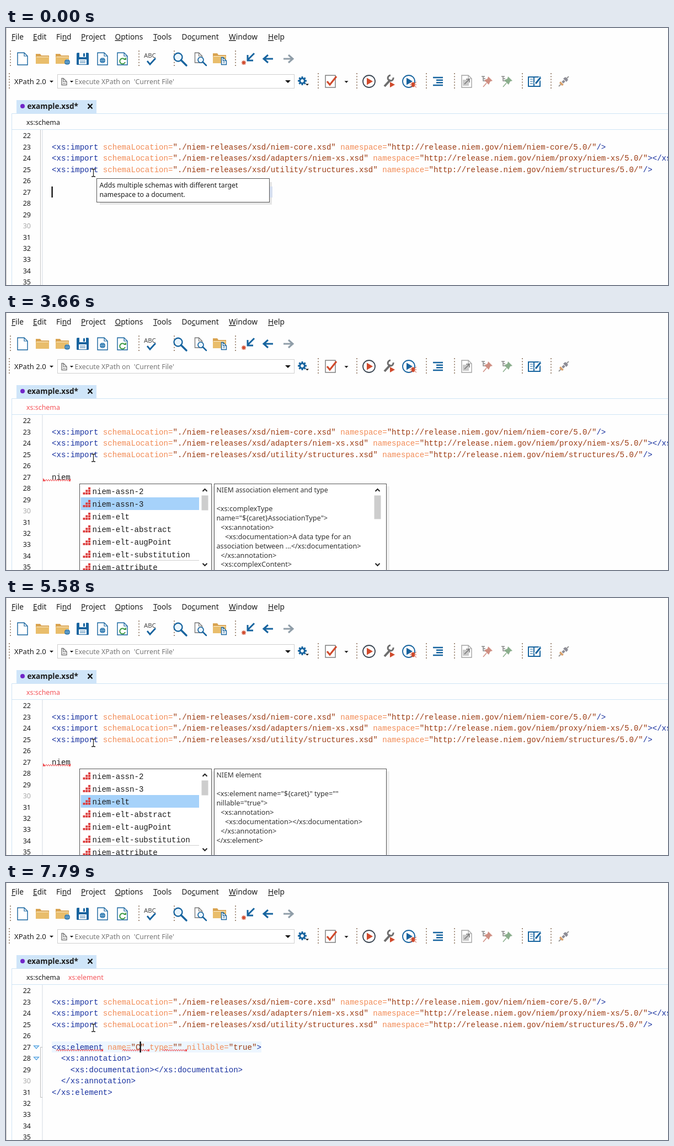
These frames come from a looping animation (1200x467 px, 8000 ms). An HTML page:

```html
<!DOCTYPE html>
<html lang="en">
<head>
<meta charset="utf-8">
<title>Code template completion</title>
<style>
html, body { margin: 0; width: 100%; height: 100%; overflow: hidden; background: #fefefe; }
svg { display: block; width: 100vw; height: 100vh; }
text { white-space: pre; font-family: "Noto Sans", "Open Sans", sans-serif; fill: #1c1c1c; }
.code { font-family: "Liberation Mono", "Courier New", monospace; font-size: 14.07px; }
.tag { fill: #17309f; }
.attr { fill: #f28b55; }
.val { fill: #9c3b12; }
.u { text-decoration: underline; }
</style>
</head>
<body>
<svg id="stage" viewBox="0 0 1200 467" xmlns="http://www.w3.org/2000/svg"></svg>
<script>
const LOOP = 8000, CHAR = 8.445, LEFT = 83;
const BLUE = '#17649f', TAN = '#e9bd6b', RED = '#d04a2c', GREY = '#a3a3a3';

const esc = s => s.replace(/&/g, '&amp;').replace(/</g, '&lt;').replace(/>/g, '&gt;');
const rect = (x, y, w, h, fill, more = '') =>
  `<rect x="${x}" y="${y}" width="${w}" height="${h}" fill="${fill}" ${more}/>`;
const line = (d, color, width = 1, more = '') =>
  `<path d="${d}" fill="none" stroke="${color}" stroke-width="${width}" ${more}/>`;
const shape = (d, fill, more = '') => `<path d="${d}" fill="${fill}" ${more}/>`;
const disc = (x, y, r, fill, more = '') => `<circle cx="${x}" cy="${y}" r="${r}" fill="${fill}" ${more}/>`;
const label = (x, y, size, s, more = '') =>
  `<text x="${x}" y="${y}" font-size="${size}" ${more}>${esc(s)}</text>`;
const at = (x, y, art) => `<g transform="translate(${x} ${y})">${art}</g>`;
const rowY = n => 196 + 20.47 * (n - 22);

// Colours tags, attributes and quoted values of one line of markup.
function code(x, y, s) {
  const parts = s.match(/"[^"]*"|<\/?[\w:]+|\/?>|[\w]+=|\s+|[^\s<>"]+/g) || [];
  const kind = p => p[0] === '"' ? 'val' : /^[<\/>]/.test(p) ? 'tag' : /=$/.test(p) ? 'attr' : '';
  return `<text class="code" x="${x}" y="${y}">` +
    parts.map(p => `<tspan class="${kind(p)}">${esc(p)}</tspan>`).join('') + '</text>';
}
const codeRow = (n, indent, s) => code(LEFT + indent * CHAR, rowY(n) + 4.5, s);

/* Toolbar icons, each drawn around its own centre */
const page = (w = 18, h = 22, color = BLUE) => {
  const x = w / 2, y = h / 2;
  return shape(`M${-x} ${-y}H${x - 6}L${x} ${6 - y}V${y}H${-x}Z`, '#fff', `stroke="${color}" stroke-width="1.4"`) +
    line(`M${x - 6} ${-y}V${6 - y}H${x}`, color, 1.2);
};
const folder = () => shape('M-12 9V-9H-4L-2 -6H12V9Z', '#d9a350') + shape('M-12 9V-3H12V9Z', TAN) +
  line('M-11 -3.5H11', '#fff3d6');
const globe = (r = 5) => disc(0, 0, r, BLUE) +
  line(`M${-r} 0H${r}M0 ${-r}V${r}`, '#a9d3ee', .8) + `<ellipse rx="${r / 2}" ry="${r}" fill="none" stroke="#a9d3ee" stroke-width=".7"/>`;
const lens = (r, w) => disc(0, 0, r, '#eaf5fd', `stroke="${BLUE}" stroke-width="${w}"`) +
  line(`M${r * .7} ${r * .7}L${r * 2} ${r * 2}`, BLUE, w * 1.5, 'stroke-linecap="round"');
const arrow = color => line('M9 0H-7M0 -7L-8 0L0 7', color, 3);
const drop = (x, y, r = 4) => shape(`M${x - r} ${y - r / 2}h${2 * r}l${-r} ${r}z`, '#111');
const grip = (x, y) => line(`M${x} ${y - 15}v30`, '#a08a78', 2, 'stroke-dasharray="2 3.2"');
const play = color => disc(0, 0, 11, '#fff', `stroke="${color}" stroke-width="1.8"`);
const pin = color => shape('M1 -10L9 -2L5 -1L2 5L-6 -3L0 -6Z', color) + line('M-2 2L-8 9', color, 1.5);
const gear = () => {
  let teeth = '';
  for (let i = 0; i < 8; i++) teeth += rect(-1.5, -8, 3, 4, BLUE, `transform="rotate(${i * 45})"`);
  return teeth + disc(0, 0, 4.4, '#fff', `stroke="${BLUE}" stroke-width="3"`);
};

function topBar() {
  const save = rect(-11, -11, 22, 22, BLUE, 'rx="1.5"') + rect(-6, -11, 12, 8, '#fff') +
    rect(1, -10, 3, 6, BLUE) + rect(-7, 1, 14, 9, '#fff') + line('M-5 4H5M-5 7H5', BLUE);
  const reload = line('M4 -2A5 5 0 1 0 5 3', '#3c9a45', 2) + shape('M2 -1H7V-6Z', '#3c9a45');
  const burst = line('M-9 3V11M-13 7H-5M-12 4L-6 10M-12 10L-6 4', RED, 1.5);
  return [8, 241, 305, 416].map(x => grip(x, 56)).join('') +
    at(30, 56, page()) + at(66, 56, folder()) +
    at(102, 56, folder() + at(9, 6, globe())) + at(139, 56, save) +
    at(175, 56, page() + at(0, 3, globe())) + at(211, 56, page() + at(0, 3, reload)) +
    label(250, 54, 11.3, 'ABC', 'style="fill:#444"') + line('M256 60l5 6l10 -11', BLUE, 2.8) +
    at(312, 53, lens(7.5, 2.3)) +
    at(349, 54, page(13, 18, '#777')) + at(353, 58, lens(5, 1.7)) +
    at(387, 55, folder() + at(8, 5, page(9, 13) + line('M-2 0H2M-2 3H2', BLUE))) +
    at(440, 56, line('M10 -10L-2 2M-2 -7V3H8', BLUE, 3) + burst) +
    at(475, 56, arrow(BLUE)) + at(512, 56, `<g transform="scale(-1 1)">${arrow('#8f9da8')}</g>`);
}

function queryBar() {
  const wrench = line('M-8 9L3 -3', '#6d6d6d', 4) + line('M8 -7A5 5 0 1 1 3 -11', '#6d6d6d', 3) + shape('M2 1V11L11 6Z', RED);
  const bug = line('M0 0L12 10M0 10L12 0M0 5H12', RED) + `<ellipse cx="6" cy="5" rx="3" ry="4.4" fill="${RED}"/>`;
  const book = line('M-1 -8H-11V9H-1ZM-1 -8H10V9H-1', BLUE, 2) + line('M-8 -4H-3M-8 0H-3M-8 4H-3', BLUE) +
    line('M1 5L11 -7', '#fff', 6) + line('M2 4L11 -7', BLUE, 3);
  const plug = line('M-9 9L-4 4M4 -4L9 -9', '#999', 2) + shape('M-6 0L0 6L-3 8L-8 3Z', '#d8a06a') + shape('M-1 -5L5 1L8 -3L3 -8Z', '#8c8c96') +
    line('M-2 -1L1 2', '#8c8c96', 5);
  const tree = color => line('M-11 -10H-5M-8 -10V-2H-4M-8 -6H-4', color, 1.5);
  return [6, 566, 636, 762, 813, 936, 988].map(x => grip(x, 97)).join('') +
    label(15, 101.5, 13.1, 'XPath 2.0') + drop(82.5, 97.5, 3.5) +
    rect(93.5, 84.5, 429, 25, '#fff', 'stroke="#cfcfcf"') +
    at(105.5, 97.5, page(9, 12, '#777') + line('M-2.5 0H2.5M-2.5 3H2.5', '#777')) + drop(119, 97.5, 3.2) +
    label(124.5, 101.5, 12.4, "Execute XPath on  'Current File'", 'style="fill:#777"') + drop(511, 97.5, 5) +
    at(537, 96, gear()) + drop(546, 103, 3) +
    at(588, 97, rect(-9, -11, 18, 22, '#fff', 'stroke="#777" stroke-width="1.4"') + line('M-6 0L-1 6L11 -9', RED, 3.2)) +
    drop(617, 98, 3.5) +
    at(658, 97, play('#3d4854') + shape('M-4 -6.5V6.5L7 0Z', RED)) + at(694, 97, wrench) +
    at(730, 97, play(BLUE) + shape('M-4 -6.5V6.5L7 0Z', BLUE) + at(2, 1, bug)) +
    at(783, 97, line('M-9 -7H9M-3 -2.3H9M-3 2.3H9M-9 7H9', BLUE, 2.6)) +
    at(835, 97, page(18, 22, GREY) + rect(-7, -3, 11, 11, '#c9c9c9') + line('M-4 5L5 -4M-1 -4H5V2', '#777', 1.5)) +
    at(873, 98, tree('#888') + pin('#cf8e82')) + at(909, 98, tree('#888') + pin('#8aae8c')) +
    at(958, 97, book) + at(1011, 97, plug);
}

function menu() {
  const items = [[10, '_File'], [49, '_Edit'], [91, 'Fi_nd'], [136, '_Project'], [197.5, '_Options'],
    [267, '_Tools'], [318.5, 'Do_cument'], [404, '_Window'], [475, '_Help']];
  return items.map(([x, s]) =>
    `<text x="${x}" y="21" font-size="13.7">${s.replace(/_(.)/, '<tspan class="u">$1</tspan>')}</text>`).join('');
}

function editor() {
  let s = rect(19, 131, 145, 25, '#cfe5f9') + disc(30, 142, 4, '#7226c9') +
    label(38.5, 146.5, 13.6, 'example.xsd*', 'font-weight="700"') +
    line('M148.500 138l8 8.500m0 -8.500l-8 8.500', '#111', 2.2) +
    line('M10.500 467V155.500H1200M10.500 184.500H1200', '#cfe4f5') + line('M.5 0V467', '#c4c4c4');
  for (let n = 22; n <= 35; n++)
    s += label(45, rowY(n) + 4.3, 12.5, String(n), `text-anchor="end" ${n === 30 ? 'style="fill:#a8a8a8"' : ''}`);
  const base = 'http://release.niem.gov/niem/';
  const imports = [['niem-core', 'niem-core', '/>'], ['adapters/niem-xs', 'proxy/niem-xs', '></xs:import>'],
    ['utility/structures', 'structures', '/>']];
  imports.forEach(([file, ns, end], i) => {
    s += codeRow(23 + i, 0, `<xs:import schemaLocation="./niem-releases/xsd/${file}.xsd" namespace="${base}${ns}/5.0/"${end}`);
  });
  return s;
}

/* Moving parts */
const caret = chars => rect(Math.round(LEFT + chars * CHAR) - .5, 288, 2.2, 20, '#000');
const band = right => rect(LEFT, 288, right - LEFT, 20, '#edf6ff');

function wave(n, from, to, ends = true) {
  const y = rowY(n) + 5.5;
  let d = `M${from} ${y + 1.5}`;
  for (let x = from + 2, up = 1; x <= to; x += 2, up = !up) d += `L${x} ${y + (up ? -1.5 : 1.5)}`;
  return line(d, '#f0474a', 1) + (ends ? shape(`M${from} ${y - 4}v6h4z`, '#f0474a') : '') +
    shape(`M${to} ${y - 3}v5h-4z`, '#f0474a');
}

const tooltip = () => rect(170, 280, 312, 41, '#e6e6e6') + rect(478, 288, 5, 20, '#d6dff0') +
  rect(164.5, 273.5, 313, 43, '#fff', 'stroke="#555"') +
  label(169.5, 290, 12.2, 'Adds multiple schemas with different target') +
  label(169.5, 306.500, 12.2, 'namespace to a document.');

const names = ['assn-2', 'assn-3', 'elt', 'elt-abstract', 'elt-augPoint', 'elt-substitution', 'attribute'];
const docs = [
  ['NIEM association element and type', '', '<xs:complexType', 'name="${caret}AssociationType">', ' <xs:annotation>',
    '  <xs:documentation>A data type for an', 'association between ...</xs:documentation>', ' </xs:annotation>', ' <xs:complexContent>'],
  ['NIEM association type, element, and', 'augmentation point', '', '<xs:element', 'name="${caret}AssociationAugmentationPoint"',
    'abstract="true">', ' <xs:annotation>', '  <xs:documentation>An augmentation point', 'for type'],
  ['NIEM element', '', '<xs:element name="${caret}" type=""', 'nillable="true">', ' <xs:annotation>',
    '  <xs:documentation></xs:documentation>', ' </xs:annotation>', '</xs:element>']];
const scroll = (x, h) => line(`M${x - 4} 324l4 -4l4 4M${x - 4} 455l4 4l4 -4`, '#222', 2) + rect(x - 6, 331.5, 12, h, '#cdcdcd');

function popup(pick, doc) {
  let s = rect(139, 315, 238, 152, '#ececec') + rect(383, 315, 312, 152, '#f0f0f0') +
    rect(133.5, 310.5, 239, 170, '#fff', 'stroke="#555"') + rect(377.5, 310.5, 312, 170, '#fff', 'stroke="#555"') +
    rect(135.5, 312 + 23 * pick, 214.5, 23, '#a6d2fa') + line('M135 449.500H350', '#cfcfcf') + scroll(360.5, 27);
  names.forEach((name, i) => {
    const y = 324 + 23 * i;
    for (let c = 0; c < 3; c++)
      for (let r = 0; r <= c; r++) s += rect(139.500 + c * 4.8, y + 2 - r * 4.6, 4, 3.8, '#dc3c3c');
    s += `<text class="code" x="156.500" y="${y + 4.5}">niem-${name}</text>`;
  });
  docs[doc].forEach((t, i) => {
    const body = t.trimStart(), indent = t.length - body.length;
    s += label(381.5 + indent * 7.8, 326.2 + i * 16.9, /[<>"]/.test(t) ? 12.7 : 12.2, body, 'style="fill:#333"');
  });
  return s + (doc < 2 ? scroll(673.5, doc ? 28 : 43) : '');
}

function element(t) {
  const value = t >= 7790 ? 'C' : '', shift = value ? 8 : 0, checked = t >= 6910;
  const rows = [[0, `<xs:element name="${value}" type="" nillable="true">`], [2, '<xs:annotation>'],
    [4, '<xs:documentation></xs:documentation>'], [2, '</xs:annotation>'], [0, '</xs:element>']];
  let s = checked ? band(455 + shift) : '';
  rows.forEach(([indent, text], i) => {
    s += codeRow(27 + i, indent, text);
    if (!checked) s += wave(27 + i, 67, Math.round(LEFT + (indent + text.length) * CHAR));
  });
  if (checked) s += wave(27, 91, 176, false) + wave(27, 211, 252 + shift, false) + wave(27, 275 + shift, 320 + shift, false);
  s += line('M66 298.500H62.500V389.500H66', '#bbb');
  for (const n of [27, 28])
    s += shape(`M50.500 ${rowY(n) - 2.500}h9l-4.500 5z`, '#e3f2ff', 'stroke="#4b9ddd" stroke-width="1.2"');
  const on = t < 6530 || (t >= 7030 && t < 7410) || t >= 7790;
  return s + (on ? caret(18 + value.length) : '');
}

function crumbs(t) {
  const red = 'style="fill:#f4555a"', inElement = t >= 5970, moved = t >= 6910;
  return label(37, 176, 12.4, 'xs:schema', t >= 2150 && !moved ? red : '') +
    (inElement ? label(113, 176, 12.4, 'xs:element', moved ? red : '') : '');
}

function scene(t) {
  const gutter = line('M66 185V467', '#d3dbe3') + (t < 2150 ? line('M62.500 185V467', '#c6c6c6') : '');
  let s = crumbs(t) + gutter;
  if (t >= 5970) return s + element(t);
  if (t < 500) return s + (t < 250 ? caret(0) : '') + tooltip();
  const typed = [500, 750, 870, 1120].filter(k => t >= k).length;
  if (t < 2150) s += band(483);
  s += `<text class="code" x="${LEFT}" y="${rowY(27) + 4.5}">${'niem'.slice(0, typed)}</text>`;
  if (t >= 2150) {
    const step = (a, b) => (t >= a) + (t >= b);
    s += wave(27, 67, 117) + popup(step(3660, 4430), step(3780, 4550));
  }
  const blinks = [1650, 2150, 2660, 3160, 3660, 4060, 4550, 5050, 5580].filter(k => t >= k).length;
  return s + (blinks % 2 ? '' : caret(typed));
}

const stage = document.getElementById('stage');
stage.innerHTML = rect(0, 0, 1200, 467, '#fefefe') + menu() + topBar() + queryBar() + editor() +
  '<g id="live"></g>' + line('M155 256.500h2.500l1 1l1 -1h2.500M158.500 257V269M155 270h2.500l1 -1l1 1h2.500', '#222', 1.3);
const live = document.getElementById('live');
let shown = '';
function render(t) {
  const next = scene(t);
  if (next !== shown) live.innerHTML = shown = next;
}
const start = performance.now();
function tick() {
  render((performance.now() - start) % LOOP);
  requestAnimationFrame(tick);
}
tick();
</script>
</body>
</html>
```
